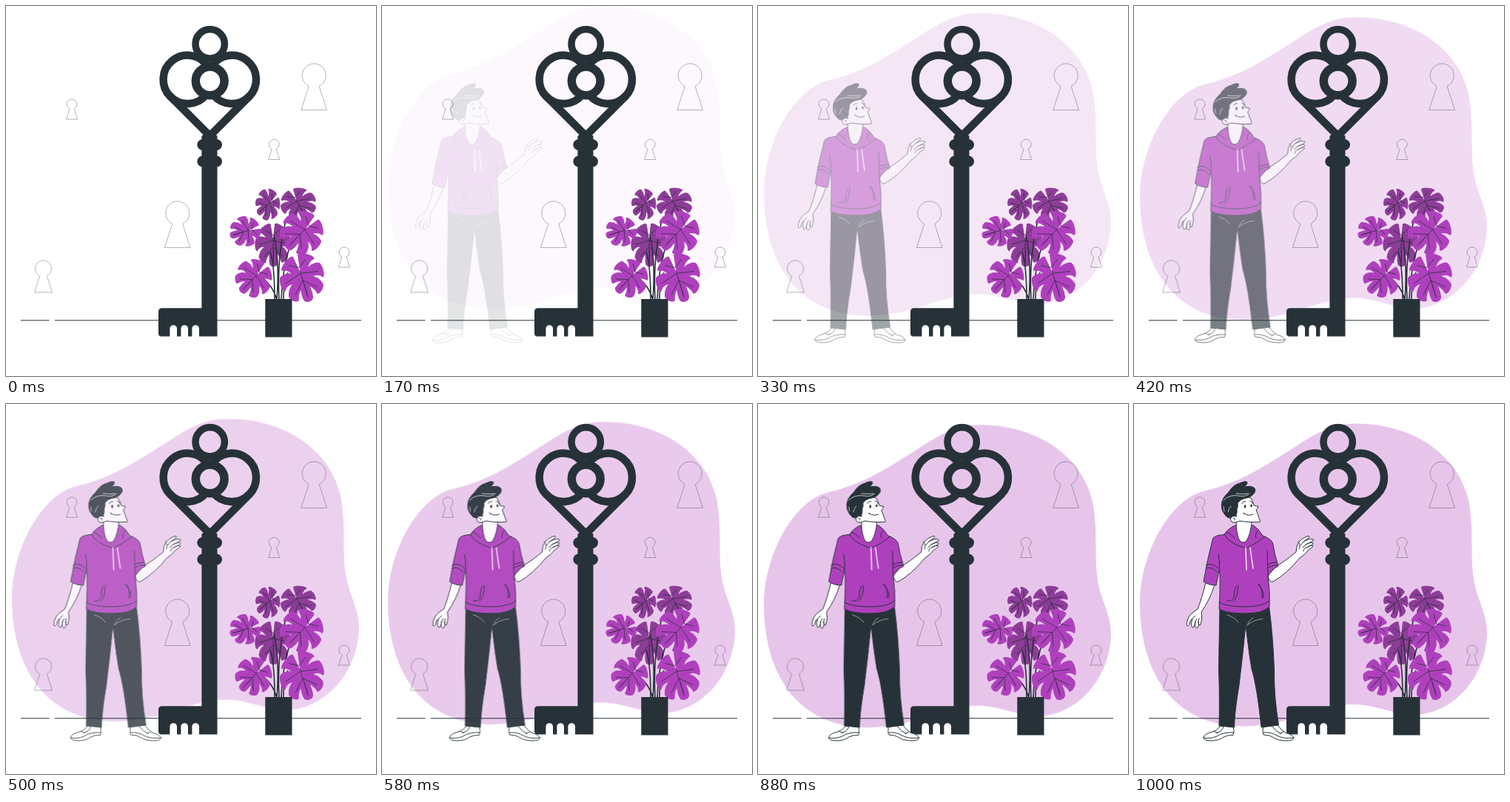
Animation of 500x500 px, one loop 1040 ms. Source, as an HTML page:

```html
<!DOCTYPE html>
<html lang="en">
<head>
<meta charset="utf-8">
<title>Man and key</title>
<style>
  html, body { margin: 0; width: 100%; height: 100%; overflow: hidden; background: #fff; }
  svg { display: block; width: 100vw; height: 100vh; }
  .dark { fill: #263238; }
  .purple { fill: #af40bd; }
  .skin { fill: #fff; }
  .line { fill: none; stroke: #263238; }
  .pale { fill: none; stroke: #fff; }
  #man { stroke: #263238; stroke-width: 1; stroke-linecap: round; stroke-linejoin: round; }
  #man .pale { stroke: #fff; }
  #holes path { fill: none; stroke: #263238; stroke-opacity: .4; stroke-width: .9; vector-effect: non-scaling-stroke; }
</style>
</head>
<body>
<svg viewBox="0 0 500 500">
  <path id="blob" fill="#e7c5eb" d="M300 26.5 C385 27 440 75 452 130 C459 165 455 200 458 228 C461 262 477 280 477 309
    C476 370 430 420 378 420 C350 419 325 406 297 406 C250 406 215 434 150 435.5 C50 436 8 358 8 270
    C8 200 50 128 95 117.5 C138 108 170 88 205 66 C240 44 262 26.5 300 26.5 Z"/>

  <g id="holes"></g>
  <path class="line" d="M20 424.8 H58.5 M66 424.8 H480"/>

  <g id="key">
    <g class="line" stroke-width="10.5">
      <circle cx="275.7" cy="51.2" r="19.7" stroke-width="9.5"/>
      <circle cx="275.7" cy="101.3" r="19.4" stroke-width="11.5"/>
      <path d="M273 82 A32.7 32.7 0 1 0 270.6 120 M277.6 82 A32.7 32.7 0 1 1 280 120"/>
      <path d="M221.5 121.500 L274 174 M329.300 121.500 L277 174"/>
    </g>
    <g class="dark">
      <path d="M264.4 176 L272 168.5 H279 L285.5 176 V446.5 H261 V436 A4.8 4.8 0 0 0 251.4 436 V446.5 H246 V436
        A4.8 4.8 0 0 0 236.4 436 V446.5 H231 V436 A4.8 4.8 0 0 0 221.4 436 V446.5 H210 Q206 446.5 206 442.5
        V413 Q206 408.300 211 408.300 H264.4 Z"/>
      <rect x="258.300" y="180" width="33.700" height="15" rx="7.5"/>
      <rect x="258.300" y="202.5" width="33.700" height="15" rx="7.5"/>
    </g>
  </g>

  <g id="plant">
    <g id="back"></g>
    <path class="line" stroke-width="1.6" d="M363 397 Q363 350 357 332 M366 397 Q370 345 362 310 M369 397 Q366 340 378 290
      M372 397 Q374 350 386 318 M375 397 Q375 372 381 360 M366 397 Q360 376 344 366"/>
    <g id="front"></g>
    <rect class="dark" x="350.3" y="396" width="36.2" height="51.5"/>
  </g>

  <g id="man">
    <!-- shoes -->
    <g class="skin">
      <path d="M117 434 Q113 441 106 443 Q95 445.5 93.5 451 Q95 455 104 455 Q115 455 121 450 Q127 447 134 447.5 Q136 442 134 435 Z"/>
      <path d="M175 436 Q173 443 175 447 Q184 447 189 451 Q195 455 207 455 Q215 455 216 451 Q213 446 205 444.5 Q199 441 194 434 Z"/>
      <path class="line" d="M94 451 Q103 453 112 449 Q121 443 135 444 M121 436 Q119 443 112 444 M108 442 L113 445
        M175 444 Q185 443 193 448 Q202 453 216 451 M187 436 Q192 443 198 445 M202 443 L197 446"/>
    </g>

    <!-- trousers -->
    <path class="dark" d="M116 273 Q115 320 114.5 360 Q116 395 115 435 L135.5 437 Q136 415 142 380 Q147 340 151 298
      Q155 335 159 358 Q166 380 172 437 L195.5 434 Q189 395 189.5 360 Q188 315 182.5 273 Z"/>
    <path class="pale" stroke-width=".7" opacity=".7" d="M126 285 Q136 288 141 295 M153 299 Q156 291 161 289 M154 298 Q163 291 174 290.5"/>

    <!-- lowered arm -->
    <path class="skin" d="M97 241 Q92 262 86 277 Q75 284 73 290 Q70 298 72 300 Q75 300 76 293 L79 290 Q76 299 79 302
      Q82 302 83 294 Q81 302 85 303 Q88 302 87 294 Q88 301 90 298 Q93 289 91 281 Q103 264 109 244 Z"/>
    <path class="line" d="M79 290 L83 286 M83 294 L85 290 M87 294 L88 290"/>

    <!-- raised arm -->
    <path class="skin" d="M193 219 Q206 211 219 200 Q219 191 223 186 Q229 180 235 178.5 Q238 178 236 181 L229 186
      Q238 181 242 183 Q244 185 240 186 L232 190 Q240 186 242 188 Q243 190 239 191 L233 194 Q240 190 242 192
      Q240 195 235 198 Q231 204 224 208 Q207 229 188 240 Q183 242 181 232 Z"/>
    <path class="line" d="M229 186 L225 191 M232 190 L228 194 M233 194 Q229 195 229 199 M222 186 Q226 191 223 196"/>

    <!-- hoodie -->
    <g class="purple">
      <path d="M122 176.5 Q109 177 106.5 182 Q99 210 94 240 Q101 245 111 245 L115.5 222 Q117 245 115 277
        Q125 283 150 283 Q174 283 183 274 Q184 252 181 233 Q185 224 195 219 Q190 204 187.5 188 Q185 182 174 178
        Q168 168 161 164 L137 164 Q127 168 122 176.5 Z"/>
      <path class="line" d="M115 268 Q125 274 150 274 Q174 274 183 266 M114 203 Q116 212 115.5 222 M180 198 L181 233
        M97 218 Q105 213 114 222 M97 222 Q105 219 112 227 M180 217 Q186 214 193 214 M180 222 Q187 217 194 218
        M138 246 Q135 252 135 261 Q133 267 126 266 M141 245 Q140 263 134 267 M169 243 Q174 250 173 262 M167 244 Q176 250 175 262"/>
      <path class="line" d="M122 176 Q126 187 151 195 Q165 189 177 179 M125 173 Q133 177 136 181 M167 171 Q163 177 165 181"/>
    </g>
    <path class="pale" stroke-width="1.3" d="M151 194 L152 224 M157 194 Q159 210 161 222"/>

    <!-- neck and face -->
    <path class="skin" d="M138 157 Q138 177 143 185 Q148 189 152 185 Q158 175 159 159 Z"/>
    <path class="skin" d="M137 130 L157 126 Q161 131 162 137 L168 138.5 Q167 142 165 143 L170.5 158 Q171 160 168 159.5
      Q153 160 143 158 Q136 161 133 160 Q129 157 131 153 Q134 150 138 152 Z"/>
    <path class="line" d="M146 134.5 Q147 131 151 132 M157 131 Q159 131 161 135 M149 148 Q154 152 161 149 M148 147 L149 149 M134 154 Q137 154 136 157"/>
    <g class="dark" stroke="none">
      <ellipse cx="150" cy="138.5" rx="1.3" ry="2.2"/>
      <ellipse cx="158.5" cy="137.500" rx="1.2" ry="2.1"/>
    </g>

    <!-- hair -->
    <path class="dark" d="M126 153 Q117 145 118.5 135 Q119 127 128 119 Q134 109 143 107 Q150 103.5 153 105.5
      Q154 108 149 112 Q158 110 162 113 Q166 117 161 122 Q158 126 150 127 Q143 129 140 134 Q141 138 139 142
      Q140 148 137 151 Q133 150 131 154 Z"/>
    <path class="pale" stroke-width=".7" d="M121 130 Q129 122 141 124 Q151 126 156 121 M121 139 L122 145 M127 146 Q128 141 131 138 M138 121 Q148 122 154 121"/>
  </g>
</svg>

<script>
  const $ = id => document.getElementById(id);
  const DARK = '#263238';

  function addPath(parent, attrs) {
    const path = document.createElementNS('http://www.w3.org/2000/svg', 'path');
    for (const name in attrs) path.setAttribute(name, attrs[name]);
    parent.append(path);
  }

  // Keyholes: middle of the base line and scale
  const holes = [
    [416.2, 140.5, 1], [231.7, 326.5, 1], [50.5, 387, .69],
    [89, 153, .435], [362.2, 207.5, .435], [457, 353, .435]
  ];
  for (const [x, y, scale] of holes) {
    addPath($('holes'), {
      d: 'M-17.3 0 L-7 -32.2 A16 16 0 1 1 7 -32.2 L17.3 0Z',
      transform: `translate(${x} ${y}) scale(${scale})`
    });
  }

  // A split leaf: broad fingers bent towards the tip, with the stem notch at angle turn
  function addLeaf(parent, fill, [x, y, rx, ry, turn]) {
    const count = 7, step = 2 * Math.PI / count;
    const at = (angle, r) =>
      `${(x + rx * r * Math.cos(angle + turn)).toFixed(1)} ${(y + ry * r * Math.sin(angle + turn)).toFixed(1)} `;
    const bend = angle => angle + .22 * Math.sin(angle);
    let shape = '', veins = `M${at(0, .3)}L${at(Math.PI, .85)}`;
    for (let i = 0; i < count; i++) {
      const a = i * step, b = a + step, mid = a + step / 2;
      const from = bend(a) + .12, to = bend(b) - .12;
      shape += (i ? 'L' : 'M') + at(a, i ? .5 : .2) +
        'Q' + at(a + .1, .75) + at(from, .92) +
        'C' + at(from + .08, 1.06) + at(to - .08, 1.06) + at(to, .92) +
        'Q' + at(b - .1, .75) + at(b, i < count - 1 ? .5 : .2);
      veins += `M${at(Math.PI, -.1 - .35 * Math.cos(mid))}L${at(bend(mid), .75)}`;
    }
    addPath(parent, { d: shape + 'Z', fill });
    addPath(parent, { d: veins, fill: 'none', stroke: DARK, 'stroke-width': .8 });
  }

  const backLeaves = [
    [354, 268, 17, 22, -.6], [395, 267, 25, 22, -2], [361, 322, 25, 30, -1.6]
  ];
  const frontLeaves = [
    [323.5, 304.5, 21.5, 21, -.3], [400, 306, 30, 30, -.8],
    [335, 367.5, 25.5, 26.5, -.8], [400, 367, 31, 34, -1.9]
  ];
  backLeaves.forEach(leaf => addLeaf($('back'), '#8e3c99', leaf));
  frontLeaves.forEach(leaf => addLeaf($('front'), '#af40bd', leaf));

  // Slide in with a small overshoot while fading in
  function slideIn(id, from) {
    const move = $(id).animate(
      [{ opacity: 0, transform: from }, { opacity: 1, transform: 'translate(0px, 0px)' }],
      { duration: 1000, easing: 'cubic-bezier(.36, -.01, .5, 1.38)', fill: 'both' });
    move.pause();
    return move;
  }
  const moves = [slideIn('man', 'translate(-30px, 0px)'), slideIn('blob', 'translate(0px, -30px)')];

  // Each step shows the pose at its middle
  const LOOP = 1040, RATE = 24 / 1000;
  const start = performance.now();
  function draw() {
    const time = (performance.now() - start) % LOOP;
    const shown = Math.min(1000, (Math.floor((time + 4) * RATE) + .5) / RATE);
    for (const move of moves) move.currentTime = shown;
    requestAnimationFrame(draw);
  }
  draw();
</script>
</body>
</html>
```
